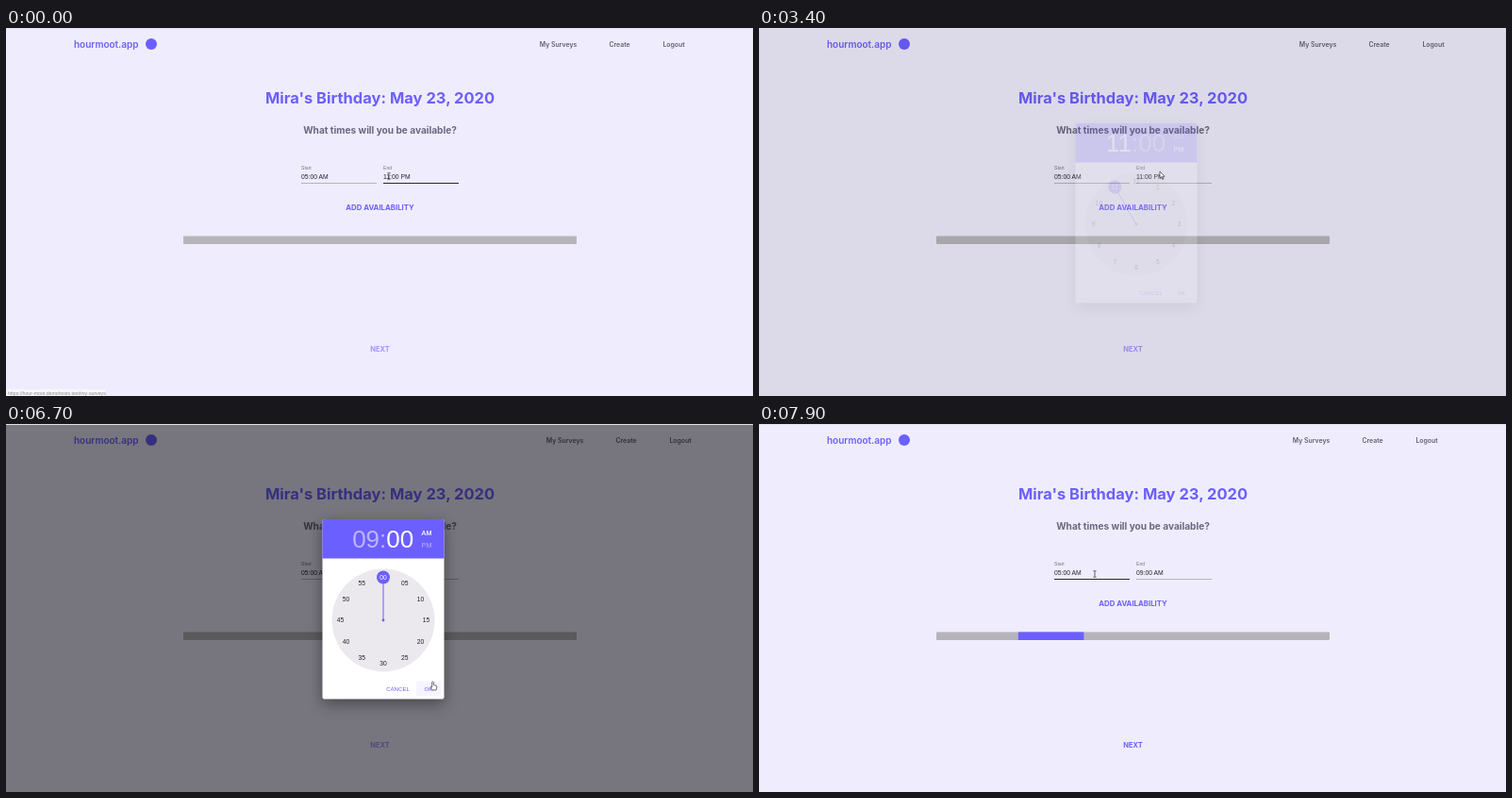
An HTML page for the animation above (8000 ms loop, 792 by 390 pixels).

```html
<!DOCTYPE html>
<html lang="en">
<head>
<meta charset="utf-8">
<title>Availability picker</title>
<style>
  html, body { margin: 0; width: 100%; height: 100%; overflow: hidden; background: #efedfd; }
  svg { display: block; width: 792px; height: 390px; }
  text { font-family: Inter, sans-serif; }
  .ui { font-family: "Liberation Sans", Arial, sans-serif; }
  .shadow { filter: drop-shadow(0 5px 8px rgba(0, 0, 0, .4)); }
</style>
</head>
<body>
<svg id="stage" viewBox="0 0 792 390"></svg>
<script>
const LOOP = 8000;
const BRAND = '#6c5fff';
const CENTER = { x: 400, y: 208 };
const NUMBER_RADIUS = 45.5;
const BAR = { x: 188, y: 220.5, width: 417, height: 8.5 };
const OPEN = { start: 3353, duration: 225 };
const CLOSE = { start: 6848, duration: 195 };

// Time, tip position, shape while travelling towards the next stop.
const PATH = [
  [0, 406, 157, 'beam'], [200, 406, 157, 'beam'], [330, 403, 172, 'arrow'], [600, 399, 190, 'hand'],
  [950, 399, 190, 'hand'], [1080, 405, 200, 'arrow'], [1450, 428, 225, 'arrow'], [2000, 432, 241, 'arrow'],
  [2120, 431, 237, 'hand'], [2550, 431, 237, 'arrow'], [3080, 425, 163, 'beam'], [3250, 425, 152, 'beam'],
  [3380, 425, 152, 'arrow'], [3500, 425, 152, 'arrow'], [4050, 437.5, 202, 'arrow'], [4350, 437.5, 202, 'arrow'],
  [5050, 355, 208, 'arrow'], [5350, 355, 208, 'arrow'], [5500, 362, 210, 'arrow'], [6000, 442, 118, 'hand'],
  [6250, 445, 115, 'hand'], [6350, 445, 128, 'arrow'], [6650, 452.5, 273, 'hand'], [7030, 452.5, 273, 'arrow'],
  [7350, 405, 191, 'hand'], [7550, 405, 191, 'arrow'], [7750, 365, 163, 'beam'], [7850, 356, 159, 'beam'],
  [8000, 356, 159, 'beam']
];

const clamp = v => Math.max(0, Math.min(1, v));
const smooth = v => v * v * (3 - 2 * v);

// The standard material curve, cubic-bezier(.4, 0, .2, 1).
function ease(v) {
  const x = clamp(v);
  let low = 0, high = 1;
  for (let i = 0; i < 20; i++) {
    const s = (low + high) / 2, r = 1 - s;
    if (3 * r * r * s * .4 + 3 * r * s * s * .2 + s ** 3 < x) low = s; else high = s;
  }
  return smooth(low);
}

const progress = (t, { start, duration }) => ease((t - start) / duration);

// Text vertically centred on its capitals.
function label(str, x, y, size, fill, { anchor = 'middle', weight = 700, ui = false, extra = '' } = {}) {
  return `<text x="${x}" y="${y + size * .36}" font-size="${size}" fill="${fill}" text-anchor="${anchor}"
    ${ui ? 'class="ui"' : `font-weight="${weight}"`} ${extra}>${str}</text>`;
}

const rect = (x, y, w, h, fill, extra = '') =>
  `<rect x="${x}" y="${y}" width="${w}" height="${h}" fill="${fill}" ${extra}/>`;

function field(name, x) {
  const options = { anchor: 'start', ui: true };
  return label(name, x, 148, 5.1, '#77757f', options)
    + label('05:00 AM', x, 158, 6.8, '#26252c', { ...options, extra: `id="value${name}"` })
    + rect(x, 164, 80, .8, '#8e8c97', `id="line${name}"`);
}

const tip = id => `<g id="${id}">${rect(-11.5, 208, 23, 8, '#615e75', 'rx="1"')}${label('', 0, 212, 5.5, '#fff', { weight: 500 })}</g>`;

function dial(id, format) {
  let out = '';
  for (let i = 0; i < 12; i++) {
    const angle = i * Math.PI / 6;
    out += label(format(i), CENTER.x + NUMBER_RADIUS * Math.sin(angle), CENTER.y - NUMBER_RADIUS * Math.cos(angle),
      6.7, '#222', { ui: true });
  }
  return `<g id="${id}">${out}</g>`;
}

const ui = { ui: true };
const stage = document.getElementById('stage');
stage.innerHTML = `
  ${rect(0, 0, 792, 390, '#efedfd')}
  ${label('hourmoot.app', 72, 17.5, 10, BRAND, { anchor: 'start', weight: 600 })}
  <circle cx="154" cy="17" r="6" fill="${BRAND}"/>
  <g id="nav">
    ${label('My Surveys', 585.5, 17.5, 6.9, '#615e72', { weight: 600 })}
    ${label('Create', 650.5, 17.5, 6.9, '#615e72', { weight: 600 })}
    ${label('Logout', 708, 17.5, 6.9, '#615e72', { weight: 600 })}
  </g>
  ${label("Mira's Birthday: May 23, 2020", 396.5, 73.7, 16.5, BRAND)}
  ${label('What times will you be available?', 396.5, 108, 10.1, '#6a677e')}
  ${field('Start', 313)}${field('End', 400)}
  ${label('ADD AVAILABILITY', 396.5, 190.3, 7.8, BRAND)}
  ${rect(BAR.x, BAR.y, BAR.width, BAR.height, '#b6b4ba', 'rx="1"')}
  ${rect(0, BAR.y, 0, BAR.height, BRAND, 'id="slot"')}
  <g id="hover">${tip('tipFrom')}${tip('tipTo')}
    ${label('DELETE', 431, 236.5, 4.6, '#aaa7b9', { weight: 600 })}</g>
  ${label('NEXT', 396.5, 340.3, 7.5, BRAND, { extra: 'id="next"' })}
  <g id="status">${rect(0, 383, 105, 7, '#f8f8fa')}
    ${label('https://hour-moot.demohosts.test/my-surveys', 2, 386.8, 5.2, '#8b8a90', { anchor: 'start', ui: true })}</g>
  ${rect(0, 0, 792, 390, '#000', 'id="backdrop"')}
  <g id="dialog">
    ${rect(335.5, 101, 129, 190.5, '#fff', 'rx="2" class="shadow"')}
    <path d="M335.5 142.5V103q0-2 2-2h125q2 0 2 2v39.5z" fill="${BRAND}"/>
    ${label('<tspan id="hour"></tspan><tspan fill-opacity=".54">:</tspan><tspan id="minute">00</tspan>', 399.7, 121.5, 26, '#fff', ui)}
    ${label('AM', 0, 115, 7.2, '#fff', { ui: true, extra: 'id="am"' })}
    ${label('PM', 0, 128, 7.2, '#fff', { ui: true, extra: 'id="pm"' })}
    <circle cx="400" cy="208" r="54.5" fill="#ebe9ed"/>
    <g id="pointer" fill="${BRAND}">
      ${rect(399.5, 162.5, 1, 45.5, BRAND)}<circle cx="400" cy="162.5" r="7"/><circle cx="400" cy="208" r="1.4"/>
    </g>
    ${dial('hours', i => i || 12)}
    ${dial('minutes', i => String(i * 5).padStart(2, '0'))}
    ${rect(435, 272.5, 26, 16, BRAND, 'rx="2" id="okHover" opacity=".07"')}
    ${label('CANCEL', 415.5, 280.7, 6.1, BRAND, ui)}
    ${label('OK', 448, 280.7, 6.1, BRAND, ui)}
  </g>
  ${rect(0, 0, 792, 1, '#e2e0e9')}
  <g id="cursor" stroke="#333" stroke-width=".7" stroke-linejoin="round" fill="#fff">
    <path id="arrow" d="M0 0V7.2L1.7 5.7 2.9 8.4 4 7.9 2.8 5.3H5.1z"/>
    <path id="hand" d="M-.8 .6Q0-.5 .8 .6V3.6L3.8 4.4Q4.5 4.7 4.3 5.8L3.5 9H-.4L-2.6 5.8Q-2.4 4.7-.8 6z"/>
    <path id="beam" d="M-1.6-3.3H-.5L0-2.9 .5-3.3H1.6M0-2.9V2.9M-1.6 3.3H-.5L0 2.9 .5 3.3H1.6" fill="none" stroke="#222"/>
  </g>`;

const el = {};
stage.querySelectorAll('[id]').forEach(node => { el[node.id] = node; });
const set = (node, name, value) => node.setAttribute(name, value);
const show = (node, on) => set(node, 'display', on ? 'inline' : 'none');

function cursorAt(t) {
  let i = 0;
  while (i < PATH.length - 2 && t >= PATH[i + 1][0]) i++;
  const [t0, x0, y0, shape] = PATH[i], [t1, x1, y1] = PATH[i + 1];
  const k = smooth(clamp((t - t0) / (t1 - t0)));
  return { x: x0 + (x1 - x0) * k, y: y0 + (y1 - y0) * k, shape };
}

function slotAt(t) {
  if (t >= 780 && t < 2180) return [5, 23];
  return t >= 7480 ? [5, 9] : null;
}

function placeTip(node, hour) {
  set(node, 'transform', `translate(${BAR.x + hour / 24 * BAR.width} 0)`);
  node.lastElementChild.textContent = `${hour % 12 || 12}:00${hour < 12 ? 'AM' : 'PM'}`;
}

function drawPage(t, cursor) {
  const slot = slotAt(t);
  const blocked = t >= OPEN.start && t < CLOSE.start + CLOSE.duration;
  const overField = x => !blocked && cursor.y > 143 && cursor.y < 166 && cursor.x >= x && cursor.x <= x + 80;
  for (const [name, x] of [['Start', 313], ['End', 400]]) {
    const active = overField(x);
    set(el['line' + name], 'fill', active ? '#2a2930' : '#a9a7b3');
    set(el['line' + name], 'height', active ? 1 : .8);
  }
  el.valueEnd.textContent = t < CLOSE.start ? '11:00 PM' : '09:00 AM';
  set(el.next, 'opacity', slot ? 1 : .62);
  show(el.status, t < 250);
  show(el.slot, slot);
  show(el.hover, slot && cursor.y > 217 && cursor.y < 246);
  if (slot) {
    const [from, to] = slot;
    set(el.slot, 'x', BAR.x + from / 24 * BAR.width);
    set(el.slot, 'width', (to - from) / 24 * BAR.width);
    placeTip(el.tipFrom, from);
    placeTip(el.tipTo, to);
  }
  // Hiding the scrollbar moves the menu while the dialog is up.
  set(el.nav, 'transform', `translate(${blocked ? 7 : 0} 0)`);
}

function drawDialog(t) {
  const opacity = progress(t, OPEN) - progress(t, CLOSE);
  show(el.dialog, opacity > .001);
  set(el.dialog, 'opacity', opacity);
  set(el.backdrop, 'opacity', opacity / 2);

  const hour = t < 5100 ? 11 : 9;
  const onMinutes = t >= 5310;
  const morning = t >= 6200;
  const angle = onMinutes ? 270 * (1 - ease((t - 5310) / 400)) : hour * 30;
  set(el.pointer, 'transform', `rotate(${angle} ${CENTER.x} ${CENTER.y})`);
  show(el.hours, !onMinutes);
  show(el.minutes, onMinutes);
  [...el.hours.children].forEach((node, i) => set(node, 'fill', i === hour ? '#fff' : '#222'));
  set(el.minutes.firstElementChild, 'fill', '#fff');

  el.hour.textContent = String(hour).padStart(2, '0');
  set(el.hour, 'fill-opacity', onMinutes ? .54 : 1);
  set(el.minute, 'fill-opacity', onMinutes ? 1 : .54);
  for (const [node, on] of [[el.am, morning], [el.pm, !morning]]) {
    set(node, 'x', hour === 11 ? 445 : 446);
    set(node, 'fill-opacity', on ? 1 : .54);
    set(node, 'stroke', on ? '#fff' : 'none');
    set(node, 'stroke-width', .2);
  }
  show(el.okHover, t >= 6600);
}

function draw(t) {
  const cursor = cursorAt(t);
  drawPage(t, cursor);
  drawDialog(t);
  set(el.cursor, 'transform', `translate(${cursor.x} ${cursor.y})`);
  for (const shape of ['arrow', 'hand', 'beam']) show(el[shape], shape === cursor.shape);
}

function tick() {
  draw(performance.now() % LOOP);
  requestAnimationFrame(tick);
}
tick();
</script>
</body>
</html>
```
